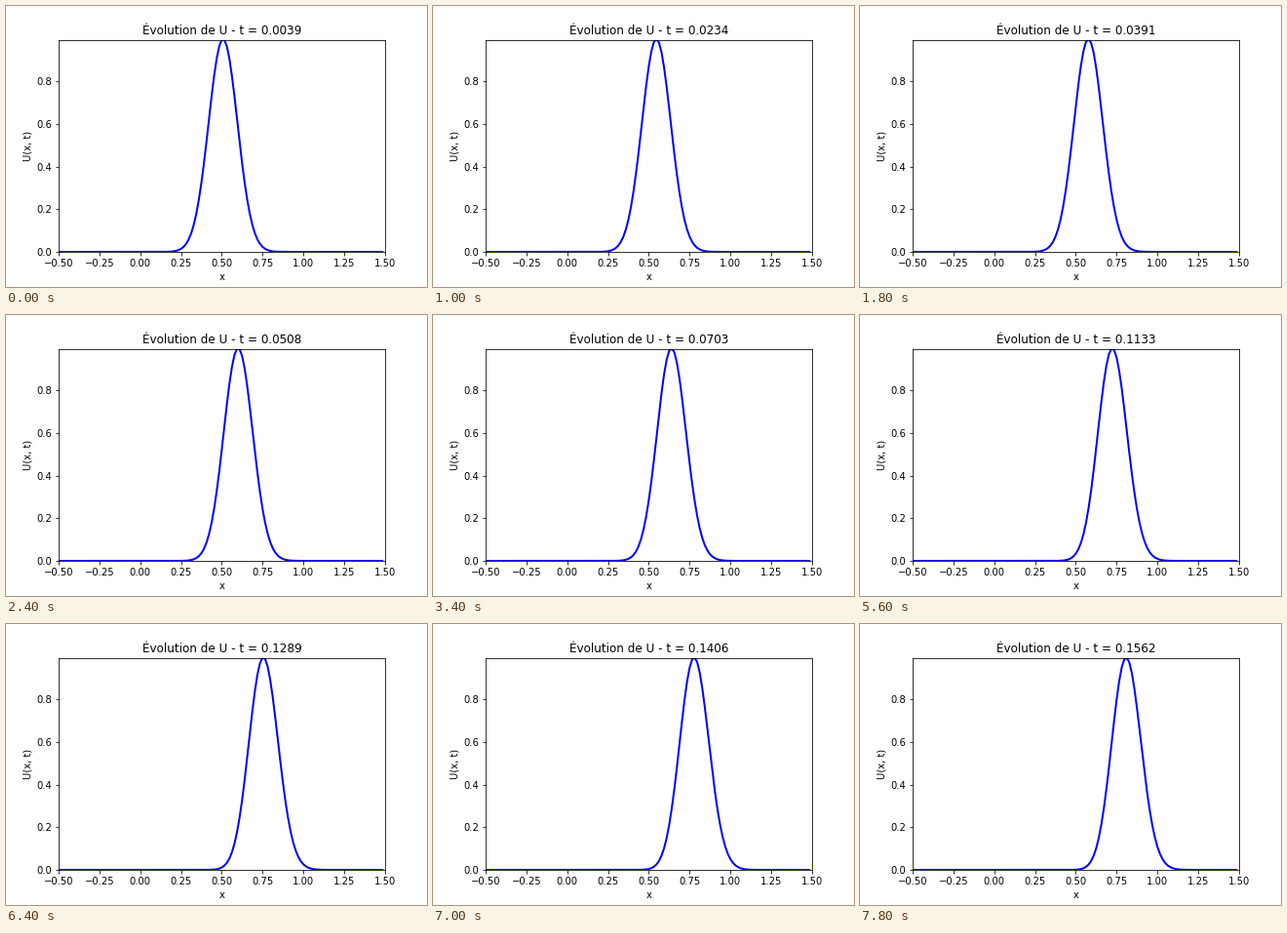
A matplotlib script for the animation above (8000 ms loop, 432 by 288 pixels).

```python
import numpy as np
import matplotlib.pyplot as plt
from matplotlib.animation import FuncAnimation

plt.rcParams.update({
    "font.family": "DejaVu Sans",
    "font.size": 10,
    "figure.subplot.left": 0.125,
    "figure.subplot.right": 0.9,
    "figure.subplot.bottom": 0.125,
    "figure.subplot.top": 0.88,
})

FRAMES = 40
SPEED = 2.0
DX = 1 / 64
DT = 1 / 256
C = SPEED * DT / DX

x = -0.5 + DX * np.arange(128)


def lax_wendroff(u):
    """Advance the advection equation by one time step."""
    left, right = np.roll(u, 1), np.roll(u, -1)
    return u - C / 2 * (right - left) + C**2 / 2 * (right - 2 * u + left)


def solve():
    u = np.exp(-64 * (x - 0.5) ** 2)
    states = []
    for _ in range(FRAMES):
        u = lax_wendroff(u)
        states.append(u)
    return states


states = solve()

fig, ax = plt.subplots(figsize=(6, 4), dpi=72)
line, = ax.plot(x, states[0], color="blue", lw=2)
ax.set_xlim(-0.5, 1.5)
ax.set_ylim(0, states[0].max())
ax.set_xlabel("x")
ax.set_ylabel("U(x, t)")
title = ax.set_title("")


def update(i):
    line.set_ydata(states[i])
    title.set_text(f"Évolution de U - t = {(i + 1) * DT:.4f}")
    return line, title


anim = FuncAnimation(fig, update, frames=FRAMES, interval=200,
                     repeat=True, repeat_delay=0, blit=False)
plt.show()
```
